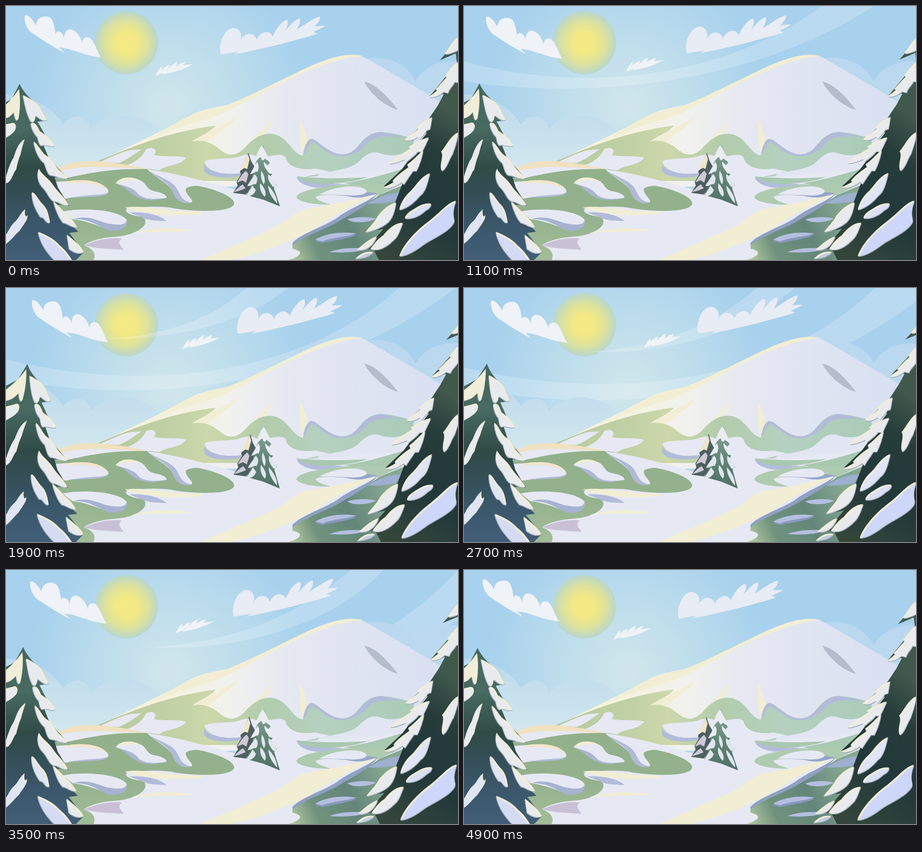
These frames come from a looping animation (800x450 px, 5 s). An HTML page with a canvas:

```html
<!DOCTYPE html>
<html lang="en">
<head>
<meta charset="utf-8">
<title>Winter hills</title>
<style>
html, body { margin: 0; width: 100%; height: 100%; overflow: hidden; }
canvas { display: block; width: 800px; height: 450px; }
</style>
</head>
<body>
<canvas id="stage" width="800" height="450"></canvas>
<script>
const g = document.getElementById('stage').getContext('2d');
const LOOP = 5000;
const SNOW = '#e6e9f3', CREAM = '#f2eed4', SHADE = '#b2bcda';
let warp = null;

// Path with every "x,y" pair passed through the current warp
const path = d => new Path2D(warp
  ? d.replace(/(-?[\d.]+),(-?[\d.]+)/g, (_, x, y) => warp(+x, +y).map(v => v.toFixed(2)).join())
  : d);
function fill(color, d) {
  g.fillStyle = color;
  g.fill(path(d));
}
function stops(grad, list) {
  list.forEach(([at, color]) => grad.addColorStop(at, color));
  return grad;
}
const linear = (x0, y0, x1, y1, ...list) => stops(g.createLinearGradient(x0, y0, x1, y1), list);
const radial = (x, y, r, ...list) => stops(g.createRadialGradient(x, y, 0, x, y, r), list);

// Piecewise linear value at time t from [time, value] pairs
function keys(t, ...list) {
  let [t0, v0] = list[0];
  for (const [t1, v1] of list) {
    if (t < t1) return t <= t0 ? v0 : v0 + (v1 - v0) * (t - t0) / (t1 - t0);
    [t0, v0] = [t1, v1];
  }
  return v0;
}

// Snow clump on a branch: shadow below, cream rim, pale body
function clump(d, side, body = '#e9eaee') {
  const p = path(d);
  const put = (color, x, y) => {
    g.save();
    g.translate(x, y);
    g.fillStyle = color;
    g.fill(p);
    g.restore();
  };
  put('#a3afbc', side, 1.5);
  put(CREAM, 0, 0);
  g.save();
  g.clip(p);
  put(body, side * 2, 2.5);
  g.restore();
}

const sky = radial(290, 180, 250, [0, '#d1e6eb'], [.45, '#bfdeec'], [1, '#a8d1ed']);
const sun = radial(213, 65, 56, [0, '#f5ea84'], [.35, '#f2e986'], [.7, '#dbe19f'], [1, '#b9d7cc']);
const haze = linear(0, 90, 0, 290, [0, '#bad7f0'], [.35, '#bad9ee'], [.55, '#c3deed'], [1, '#d3e7ee']);
const peak = linear(260, 0, 800, 0, [0, '#f5f2dc'], [.25, '#f1f1ee'], [.45, '#e6e8f2'], [1, '#d6dff2']);
const slope = linear(160, 0, 720, 0, [0, '#b5ca9e'], [.25, '#c2d1a6'], [.36, '#ccd8aa'], [.53, '#b2ccac'], [.72, '#b5d0bf'], [1, '#aacbb8']);
const field = linear(0, 290, 0, 450, [0, '#92b18a'], [.5, '#94b18d'], [1, '#a2bd98']);
const glen = linear(505, 450, 680, 370, [0, '#b5cba3'], [.25, '#70927d'], [.6, '#64867a'], [1, '#86a792']);
const firLeft = linear(0, 138, 0, 450, [0, '#46675e'], [.25, '#476a61'], [.48, '#304b46'], [.62, '#334e55'], [.78, '#3a5669'], [1, '#425e78']);
const firRight = linear(640, 420, 800, 200, [0, '#35473b'], [.4, '#22383a'], [.75, '#263d3b'], [1, '#41584d']);
const firMid = linear(0, 246, 0, 355, [0, '#8aa89c'], [.5, '#628677'], [1, '#4f7065']);

function streak(d, from, to) {
  if (to <= from) return;
  g.save();
  g.beginPath();
  g.rect(from, 0, to - from, 300);
  g.clip();
  fill('rgba(255,255,255,.2)', d);
  g.restore();
}

function wind(t) {
  const s = keys(t, [300, -.4], [1100, 0], [1900, 1], [2700, 1.5], [4100, 3.5], [4600, 4.2]);
  streak(`M-20,${92 + 29 * s} C${200 + 35 * s},${160 + 31 * s} ${460 + 60 * s},${130 + 28 * s} ${633 + 63 * s},0
    L${725 + 70 * s},0 C${520 + 60 * s},${135 + 34 * s} ${220 + 35 * s},${172 + 44 * s} -20,${130 + 27 * s}Z`,
    keys(t, [2700, -20], [3500, 640], [4100, 700], [4500, 820]),
    keys(t, [300, -50], [1000, 820]));
  const q = (t - 1900) / 1600;
  streak(`M${175 + 75 * q},${90 + 47 * q} C${290 + 110 * q},${85 + 45 * q} ${370 + 150 * q},${50 + 30 * q} ${425 + 185 * q},0
    L${500 + 168 * q},0 C${430 + 150 * q},${55 + 40 * q} ${320 + 100 * q},${92 + 53 * q} ${175 + 75 * q},${90 + 47 * q}Z`,
    keys(t, [3500, 100], [4050, 800]),
    keys(t, [1200, 80], [1800, 820]));
}

function clouds(t) {
  const k = (1 - Math.cos(2 * Math.PI * t / LOOP)) / 2;
  const drift = (dx, dy, color, d) => {
    g.save();
    g.translate(dx * k, dy * k);
    fill(color, d);
    g.restore();
  };
  drift(15, 6, '#eff2f7', 'M33,17 C38,14 46,22 53,34 C54,24 60,17 74,19 C84,20 86,38 88,50 C88,42 101,44 103,58 C103,42 112,38 121,44 C128,48 133,58 135,66 C134,56 144,52 150,58 C158,66 160,78 168,91 C150,90 130,82 110,76 L94,73 L104,83 C82,72 58,56 46,48 C36,40 32,28 33,17Z');
  drift(35, -5.5, '#e8ecf4', 'M379,81 C377,62 388,39 403,39 C417,40 418,54 415,62 C421,46 440,45 444,60 C450,44 467,42 472,54 C478,40 490,24 498,25 C501,32 496,40 494,45 C502,34 514,22 520,22 C522,28 518,36 514,42 C528,34 545,20 556,19 C556,26 550,32 546,36 L565,35 C558,40 550,43 544,46 L552,49 C510,62 455,76 403,86 L412,81 L380,86Z');
  drift(55, -18, '#f0f3f6', 'M264,124 C268,116 272,110 276,106 L276,113 C280,108 286,105 290,104 L287,111 C294,104 300,100 303,99 L301,107 C308,102 314,99 318,99 L313,105 L331,103 C312,114 295,118 276,121 L279,118Z');
}

function mountain() {
  fill(peak, 'M150,282 C200,258 290,215 330,192 C355,180 385,178 405,172 C445,154 500,124 540,106 C575,91 615,78 640,94 C670,112 725,142 800,190 V320 H150Z');
  fill(CREAM, 'M258,234 C310,200 340,184 390,176 C440,156 500,124 540,106 C575,91 605,82 632,89 C600,90 560,104 530,117 C490,134 470,146 440,162 C410,178 400,182 385,190 C350,204 320,208 258,234Z');
  fill(CREAM, 'M330,239 L412,195 C395,215 372,228 358,240Z M418,255 C440,235 455,215 471,203 C465,222 450,232 430,250Z M520,200 C528,215 532,228 533,240 L524,262 C518,240 521,220 520,200Z');
  fill('#b5bdcd', 'M634,134 C655,138 675,160 694,184 C670,178 645,155 634,134Z');
  fill(slope, 'M160,276 C220,250 290,222 371,212 C365,222 340,232 329,240 C350,236 365,243 378,254 C395,268 408,265 422,252 C440,230 465,218 488,233 C505,246 510,262 525,265 C530,262 527,240 540,235 C560,240 565,265 600,264 C625,258 625,232 655,224 C680,222 700,230 722,234 L720,262 L640,300 L520,310 H350 L260,292 L150,290Z');
  fill(SHADE, 'M526,264 C528,246 535,232 546,237 C565,250 580,266 602,262 C630,255 630,225 665,223 L712,234 C680,230 655,228 640,243 C622,266 590,272 570,260 C555,250 545,240 540,242 C534,246 534,256 526,264Z');
  fill(SNOW, 'M165,277 C190,266 205,258 222,255 L240,254 C228,262 215,272 200,278Z M248,254 C258,248 270,254 262,264 C280,268 305,264 319,269 C305,285 285,280 272,291 L205,284 C225,280 240,270 248,254Z');
  fill(SHADE, 'M351,280 C358,298 395,296 420,288 L420,300 C395,306 355,306 350,290Z');
  fill(SNOW, 'M351,275 C370,268 400,272 415,266 C425,262 440,262 450,270 C480,262 490,262 495,268 C498,285 520,292 548,288 L572,293 L520,305 L430,330 L420,295 C395,300 358,298 351,275Z');
  fill(SHADE, 'M550,301 C600,296 620,285 632,270 L722,265 L700,300 L560,307Z');
  fill('#e2e6f3', 'M555,296 C600,290 615,285 625,275 C640,260 650,256 665,262 C690,268 700,262 715,256 L800,260 L720,300 C670,290 640,306 550,303Z');
}

function leftField() {
  fill(SNOW, 'M90,290 C130,268 210,282 260,291 C300,298 370,315 405,325 L520,304 L700,290 L800,300 V450 H0 V290Z');
  fill('#f0e1c0', 'M92,288 C125,266 190,275 255,290 C200,286 150,280 92,292Z');
  fill(field, 'M96,306 C130,302 170,286 255,289 C290,296 300,304 335,318 C362,322 404,336 404,350 C402,364 350,366 300,359 C270,352 230,358 215,358 C205,366 225,372 243,374 C258,390 225,408 190,409 C165,411 145,418 138,424 C155,430 160,440 155,450 H60 V300Z');
  fill(SHADE, 'M85,342 C140,336 180,342 182,328 L100,325Z');
  fill(SNOW, 'M85,312 C120,308 165,310 180,325 C188,338 150,331 108,341 H85Z');
  fill('#f2e6cc', 'M105,311 C140,305 170,310 181,326 C165,315 140,312 105,314Z');
  fill('#aab6d3', 'M194,315 C215,318 220,345 262,344 L284,340 L240,318Z');
  fill(SNOW, 'M194,314 C205,300 225,302 240,310 C250,316 248,325 262,328 C275,330 285,335 284,340 C265,343 242,343 234,333 C226,321 205,318 194,314Z');
  fill(CREAM, 'M194,314 C205,300 228,302 242,312 C225,306 212,308 194,314Z');
  fill(SNOW, 'M250,289 C275,293 300,297 330,305 L395,322 C370,318 320,315 318,325 C318,335 335,345 328,348 C310,352 300,340 296,330 C290,315 265,305 250,289Z');
  fill('#b0bad6', 'M252,292 C270,306 292,315 296,332 C302,348 318,352 328,348 C308,345 308,330 300,320 C290,308 270,302 252,292Z');
  fill(SNOW, 'M100,364 C140,356 200,362 213,378 C218,395 195,392 180,396 C160,388 140,380 118,378Z');
  fill('#a6b2d0', 'M118,378 C150,376 165,392 182,398 C205,400 216,392 213,380 C212,390 190,388 175,384 C150,374 135,372 118,378Z');
  fill(CREAM, 'M210,357 C250,352 280,365 340,364 C370,368 320,372 280,370 C250,368 230,364 210,357Z M222,402 C255,392 300,392 335,398 C300,400 250,400 222,402Z');
  fill(SHADE, 'M218,366 C240,364 270,368 284,381 C262,380 250,380 240,374Z');
  fill('#c9c0d6', 'M138,424 C165,412 190,410 205,412 C195,420 205,425 208,432 C180,430 160,430 138,424Z');
}

function rightField() {
  fill('#a9c8b0', 'M515,302 C560,306 600,306 640,303 C620,312 580,315 545,318 C530,316 515,310 515,302Z M598,314 C640,308 670,298 705,288 L690,320 C650,325 630,318 598,314Z');
  fill(SHADE, 'M515,302 C515,314 535,320 550,322 C580,320 590,316 600,315 C570,315 530,318 515,302Z');
  fill('#aecbb0', 'M514,338 C520,326 560,320 600,316 L700,316 L660,335 C600,336 560,332 548,338 C550,346 572,350 574,352 C540,352 514,346 514,338Z');
  fill('#96a6ca', 'M560,334 C590,326 630,328 658,332 C635,342 615,340 600,336Z');
  fill(SNOW, 'M555,334 C580,318 625,316 636,325 C645,332 625,338 600,335Z');
  fill(CREAM, 'M345,450 C400,425 440,410 480,390 C500,380 510,362 540,358 C580,352 620,342 655,333 C630,345 600,360 570,378 C540,400 470,440 400,450Z');
  fill(SNOW, 'M400,450 C470,435 540,398 585,376 C560,392 520,404 508,420 L525,450Z');
  fill(glen, 'M507,424 C514,406 560,394 585,378 C605,362 640,352 660,335 L720,310 L800,300 V450 H500 C526,442 526,434 507,430Z');
  fill('#8fa0c2', 'M507,420 C520,404 560,392 585,376 C605,360 635,350 658,333 C640,354 615,366 592,380 C565,396 530,406 507,424Z');
  fill('#8799bd', 'M547,417 C575,406 600,406 620,405 C610,412 575,416 560,420Z');
  fill('#b4bfe0', 'M547,414 C570,400 600,400 620,403 C610,408 575,410 560,417Z M604,378 C625,372 645,374 655,377 C640,384 615,386 604,378Z M572,436 C600,426 620,430 640,428 C630,436 600,438 572,436Z');
  fill('#9eafd0', 'M640,350 C660,338 680,330 700,330 L690,346 C670,350 655,350 640,350Z');
}

function midTrees(k) {
  warp = (x, y) => [x + 5 * k * (345 - y) / 100, y - 2 * k * (345 - y) / 100];
  fill('#4d5f61', 'M429,260 L434,275 L440,285 L432,325 L424,334 L402,331 L410,318 L408,312 L416,298 L414,294 L422,276Z');
  fill('#efe6c8', 'M428,262 C424,272 419,280 414,292 L422,287 L427,289 L431,272Z');
  fill('#cfc8d6', 'M425,292 C417,298 413,306 409,313 L418,309 L425,313 L429,298Z M419,316 C412,320 407,326 403,330 L414,327 L424,323Z');
  fill(firMid, 'M454,246 L461,262 L458,266 L467,278 L463,282 L471,298 L468,302 L479,318 L474,322 L485,355 L455,343 L425,335 L432,320 L428,318 L438,300 L436,298 L443,282 L441,280 L448,264Z');
  fill('#e9ecf0', 'M453,247 C446,254 443,266 440,276 C446,274 447,268 451,268 C452,274 456,276 458,270 C462,274 466,276 468,272 C462,266 459,256 453,247Z M444,276 C440,284 436,290 432,298 C438,298 441,292 445,294 C447,290 449,282 444,276Z M456,276 C456,286 462,290 465,296 C468,298 471,296 474,300 C470,290 464,282 456,276Z');
  fill('#e2e6ee', 'M440,298 C436,306 430,312 427,319 C434,320 438,314 442,316 C446,310 446,302 440,298Z M452,292 C450,302 452,308 456,316 C460,312 458,300 452,292Z M464,298 C462,308 468,314 472,320 L480,322 C476,312 472,304 464,298Z M436,318 C432,326 427,332 424,338 C432,338 440,334 442,326Z M450,314 C448,324 452,332 458,338 C462,332 458,322 450,314Z M464,318 C464,330 472,342 480,350 C480,338 472,326 464,318Z');
}

function leftTree(k) {
  warp = (x, y) => {
    const u = (300 - y) / 160;
    const dx = u > 0 ? 17 * u ** 1.3 : -3 * Math.sin(Math.PI * Math.min(1, (y - 300) / 150));
    return [x + k * dx, y - 4 * k * Math.max(0, u)];
  };
  fill(firLeft, 'M24,138 C32,156 48,168 62,182 L72,203 L56,205 L70,230 L86,249 L66,246 L76,270 L110,306 L86,304 L92,322 L112,354 L92,352 L100,372 L128,400 L112,402 L138,436 L124,450 H-30 V205 L8,196 L-20,200 V180 L10,165Z');
  const s = (d, body) => clump(d, -1, body);
  s('M23,147 C16,158 5,172 -14,186 V200 C6,200 10,192 14,188 C16,198 18,206 22,200 C25,185 26,165 23,147Z', '#f0edd8');
  s('M30,158 C45,164 58,175 62,182 C66,190 70,198 72,202 C64,205 58,196 52,194 C52,202 50,208 44,204 C36,190 34,175 30,158Z');
  s('M44,208 C52,204 56,214 60,222 C70,228 80,236 86,248 C80,250 72,246 66,246 C60,250 58,240 56,232 C50,226 46,218 44,208Z');
  s('M49,240 C58,246 62,258 70,264 C84,272 86,284 98,294 L110,305 C100,308 88,300 82,300 C74,300 72,288 68,278 C58,270 52,256 49,240Z');
  s('M58,288 C64,300 76,305 84,318 C92,330 104,338 111,353 C100,354 92,345 86,346 C78,344 74,330 66,322 C58,314 54,302 58,288Z');
  s('M84,346 C92,352 98,360 106,368 C116,376 122,384 126,392 C116,392 108,384 102,384 C94,376 88,360 84,346Z');
  s('M46,330 C52,330 58,345 66,352 C74,360 76,372 78,384 C70,385 68,372 62,374 C56,366 46,350 46,330Z', '#e0e5f3');
  s('M57,400 C70,405 85,412 95,424 C105,432 112,442 118,452 H88 C76,440 62,424 57,400Z', '#d5dbf2');
  s('M8,208 C16,204 20,212 16,220 C10,228 4,230 -12,240 V212Z');
  s('M33,236 C22,242 18,256 14,268 C6,280 2,298 -3,314 L4,312 C12,306 14,292 18,290 C20,280 22,272 26,262 C28,252 30,246 33,236Z');
  s('M34,360 C24,368 24,376 14,384 C6,392 4,404 -8,414 V426 C8,418 18,402 24,398 C30,388 40,378 38,370 C36,376 32,372 34,360Z', '#e0e5f3');
  s('M108,405 C120,415 132,424 138,436 C128,440 120,436 112,430Z');
}

function rightTree(k) {
  warp = (x, y) => [x + k * (4.5 + 9 * Math.max(0, (160 - y) / 65)), y - 5 * k * (450 - y) / 350];
  fill(firRight, 'M804,54 L768,96 L796,84 L798,100 L776,128 L750,160 L775,156 L765,175 L745,205 L706,237 L745,225 L725,250 L680,279 L715,270 L700,290 L668,320 L702,314 L688,350 L665,375 L636,401 L668,395 L655,410 L622,432 L650,430 L660,450 H820 V54Z');
  const s = (d, body) => clump(d, 1, body);
  s('M803,54 C788,62 786,74 778,82 C772,88 790,84 803,76Z');
  s('M802,98 C790,104 784,116 777,124 L780,126 C772,134 766,142 760,148 L764,149 C758,154 753,157 749,161 C758,163 768,158 774,152 L782,154 C784,146 790,142 794,134 L802,136Z');
  s('M754,197 C742,202 734,208 726,216 L730,218 C720,226 712,230 705,237 C714,240 722,236 728,232 L732,236 C738,228 742,226 744,220 L750,218 C752,210 752,204 754,197Z');
  s('M748,233 C734,236 722,244 712,250 L716,252 C704,260 690,268 678,279 C688,280 698,274 706,272 L708,276 C718,268 724,264 728,258 L736,258 C740,250 744,242 748,233Z');
  s('M738,256 C728,264 720,274 710,281 L712,286 C700,294 690,302 684,310 L686,312 C680,316 674,318 668,322 C680,324 692,318 700,312 L704,316 C710,306 716,298 720,292 L726,292 C732,280 736,268 738,256Z');
  s('M800,224 C786,230 778,250 770,258 C776,266 766,280 771,292 C780,288 784,270 790,262 C794,250 798,240 800,224Z');
  s('M750,296 C734,302 726,318 716,328 C706,336 698,350 696,361 C710,358 724,346 732,336 C742,330 746,312 750,296Z', '#dfe5f6');
  s('M690,348 C676,352 666,362 658,372 C652,384 642,392 636,401 C650,398 664,392 672,386 C684,378 688,362 690,348Z');
  s('M752,350 C738,348 728,356 718,362 C708,368 706,374 706,376 C720,378 734,370 742,362 C750,358 752,354 752,350Z', '#d9e0f6');
  s('M702,384 C688,384 676,396 668,406 C656,414 650,424 645,430 C660,436 676,424 686,414 C694,408 698,394 702,384Z');
  s('M796,345 C782,348 770,364 750,380 C728,396 704,420 696,443 C712,442 728,430 742,420 C762,408 784,398 792,384 C796,376 786,372 796,345Z', '#cdd7fa');
  s('M656,408 C644,412 632,422 621,432 C634,434 648,428 656,408Z');
  s('M618,448 C630,436 640,434 650,436 C640,446 630,446 618,448Z', '#c3cde6');
}

function draw(t) {
  const off = (t - 2480) / (t < 2480 ? 1950 : 1750);
  const sway = Math.abs(off) < 1 ? (1 + Math.cos(Math.PI * off)) / 2 : 0;
  warp = null;
  fill(sky, 'M0,0 H800 V450 H0Z');
  fill(sun, 'M157,65 a56,56 0 1 1 112,0 a56,56 0 1 1 -112,0Z');
  wind(t);
  fill(haze, 'M0,157 C40,155 85,180 101,210 C115,190 145,190 150,218 C180,185 235,185 272,222 L240,300 H0Z M620,98 C660,82 710,98 725,134 C740,106 770,96 800,98 V220 H620Z');
  clouds(t);
  mountain();
  leftField();
  rightField();
  midTrees(sway);
  leftTree(sway);
  rightTree(sway);
}

function tick(now) {
  draw(Math.floor(now % LOOP / 100) * 100);
  requestAnimationFrame(tick);
}
draw(0);
requestAnimationFrame(tick);
</script>
</body>
</html>
```
